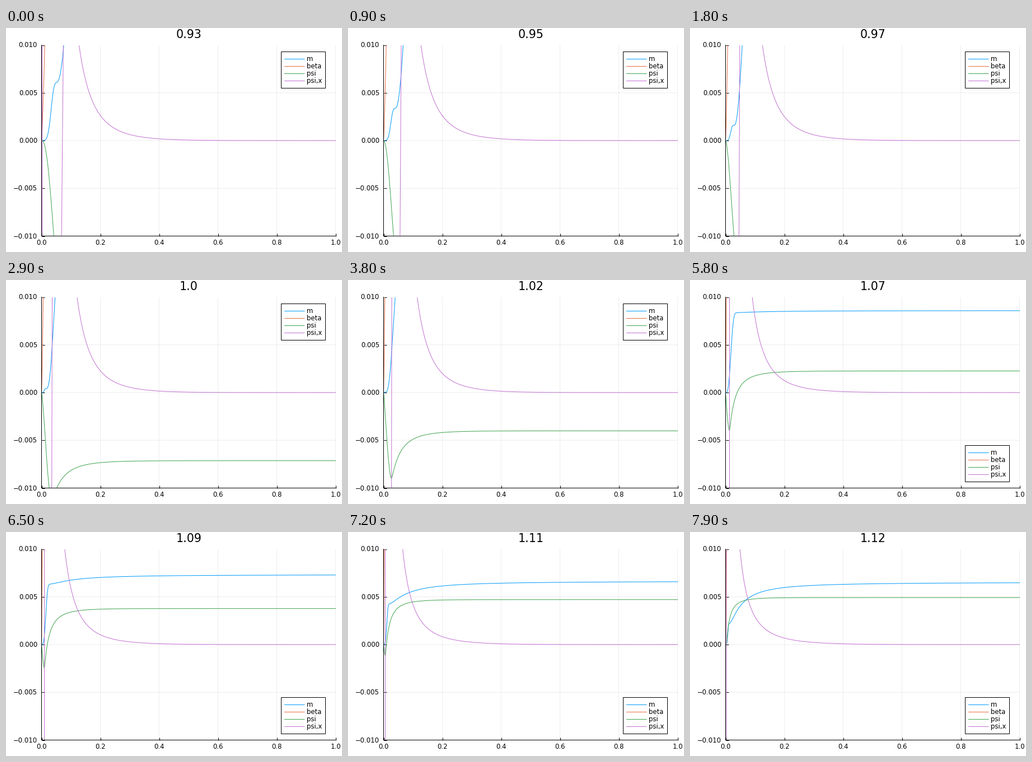
These frames come from a looping animation (600x400 px, 8000 ms). A matplotlib script:

```python
import numpy as np
import matplotlib.pyplot as plt
from matplotlib.animation import FuncAnimation
from matplotlib.patches import Rectangle

W, H, DPI = 600, 400, 100
FRAMES, STEP = 80, 100
PX = 72 / DPI
LEFT, RIGHT, TOP, BOTTOM = 63.5, 588.5, 30.5, 371.5
COLORS = {"m": "#009AFA", "beta": "#E36F47", "psi": "#3EA44E", "psi,x": "#C371D2"}

X = np.linspace(0, 1, 900) ** 3
S = np.linspace(0, 1, 400)


def poly(t, *coefs):
    return sum(c * t ** i for i, c in enumerate(coefs))


def rise(x, start, width, power):
    """Smooth step from 0 to 1 that begins at start."""
    return 1 - np.exp(-np.minimum((np.maximum(x - start, 0) / width) ** power, 50))


def crossing(n):
    """Where psi has its minimum; it shrinks towards the origin."""
    return 0.0932 * np.exp(-n / 60.4) - 0.0222


def curve_m(n):
    """Mass in 1e-3: a fading inner step, the main step and a slow tail."""
    u = n / (FRAMES - 1)
    q = max(1 - n / 46, 0)
    z = max(n - 52, 0) / 27
    reach = poly((n - 58) / 10, .0206, -.0066, .0006, -.00013)
    start = .051 * q ** 1.15
    inner = 6.1 * q ** 2.7 * rise(X, 0, .0345 * q ** 1.3 + 1e-4, 4.5)
    main = (2.24 + .292 * (79 - n)) * rise(X, start, reach - start, 2.3 + 1.7 * u ** 2)
    v = (np.maximum(X - 1.8 * reach, 0) / (5.5 * reach)) ** 1.33
    return X, (inner + main + 4.3 * z ** 2 * v / (1 + v)) / 1000


def curve_beta(n):
    width = .002 + .009 * (1 - n / (FRAMES - 1)) ** 2
    return 2 * S * width, 0.01 * (2 * S) ** 1.3


def curve_psi(n):
    """A sine-like drop to the minimum, then a log-spaced climb to the far value."""
    c, u, w = crossing(n), n / (FRAMES - 1), (n - 58) / 10
    far = poly(w, 2.26, 2.51, -.449, -.068)
    low = -poly(w, 3.97, -2.3, .16, .028)
    late = u ** 8
    core = low * np.sin(np.pi / 2 * S) ** (1 + 1.4 * (1 - u) ** 3)
    climb = far + (low - far) * (1 - S ** (1.2 + .35 * late)) ** (5 + late)
    return np.r_[c * S, c ** (1 - S)], np.r_[core, climb] / 1000


def curve_slope(n):
    """Steep zero crossing, then a power-law fall that passes 0.01 at x = f."""
    c, u = crossing(n), n / (FRAMES - 1)
    f = .1275 - .0785 * u ** 2.45
    x = np.geomspace(0.8 * f, 1, 400)
    y = 0.01 * (f / x) ** (2.2 - .78 * u ** 4) * ((1 - x) / (1 - f)) ** 4
    steep = np.array([-3, 3])
    hx, hy = c + .6 * c ** 2 * steep, steep / 100
    if n < 9:  # early spike at the origin
        hx, hy = np.r_[.001, .003, hx], np.r_[.03, -.03, hy]
    return np.r_[hx, x], np.r_[hy, y]


CURVES = dict(zip(COLORS, [curve_m, curve_beta, curve_psi, curve_slope]))

plt.rcParams.update({"font.family": "DejaVu Sans", "path.snap": False})
fig = plt.figure(figsize=(W / DPI, H / DPI), dpi=DPI, facecolor="white")
ax = fig.add_axes([LEFT / W, 1 - BOTTOM / H, (RIGHT - LEFT) / W, (BOTTOM - TOP) / H])
ax.set(xlim=(0, 1), ylim=(-.01, .01))
ax.set_axisbelow(True)
ax.grid(color="black", alpha=0.07, lw=PX)
ax.spines[["top", "right"]].set_visible(False)
for s in ax.spines.values():
    s.set(linewidth=PX, zorder=4)
ax.set_xticks(np.linspace(0, 1, 6))
ax.set_yticks(np.linspace(-.01, .01, 5))
ax.tick_params(direction="in", length=5 * PX, width=PX, labelbottom=False, labelleft=False)
lines = {k: ax.plot([], [], color=c, lw=PX, zorder=3)[0] for k, c in COLORS.items()}

# Pixel-space layer for text and legend
page = fig.add_axes([0, 0, 1, 1])
page.set(xlim=(0, W), ylim=(H, 0))
page.axis("off")


def label(x, y, s, ha, size=8.4):
    return page.text(x, y, s, ha=ha, va="baseline", fontsize=size)


for i in range(6):
    label(LEFT + i / 5 * (RIGHT - LEFT), 387, f"{i / 5:.1f}", "center")
for i in range(5):
    s = f"{.01 - i * .005:.3f}".replace("-", "\u2212")
    label(56, TOP + i / 4 * (BOTTOM - TOP) + 4, s, "right")
title = label(326.3, 18.2, "", "center", 14.8)

box = page.add_patch(Rectangle((491.5, 42.5), 79, 65, fc="white", ec="black", lw=PX))
entries = []
for i, (name, color) in enumerate(COLORS.items()):
    stroke, = page.plot([497.5, 533], [0, 0], color=color, lw=PX)
    entries.append((stroke, label(537.5, 0, name, "left"), 13 + 13 * i))


def place_legend(top):
    box.set_y(top)
    for stroke, text, dy in entries:
        stroke.set_ydata([top + dy] * 2)
        text.set_y(top + dy + 3.2)


def update(n):
    for name, curve in CURVES.items():
        lines[name].set_data(*curve(n))
    title.set_text(str(round(0.926 + 0.0025 * n, 2)))
    far_m = lines["m"].get_ydata()[-1]
    place_legend(295.5 if far_m < 0.01 else 42.5)
    return []


anim = FuncAnimation(fig, update, frames=FRAMES, interval=STEP, repeat=True, repeat_delay=0)
plt.show()
```
